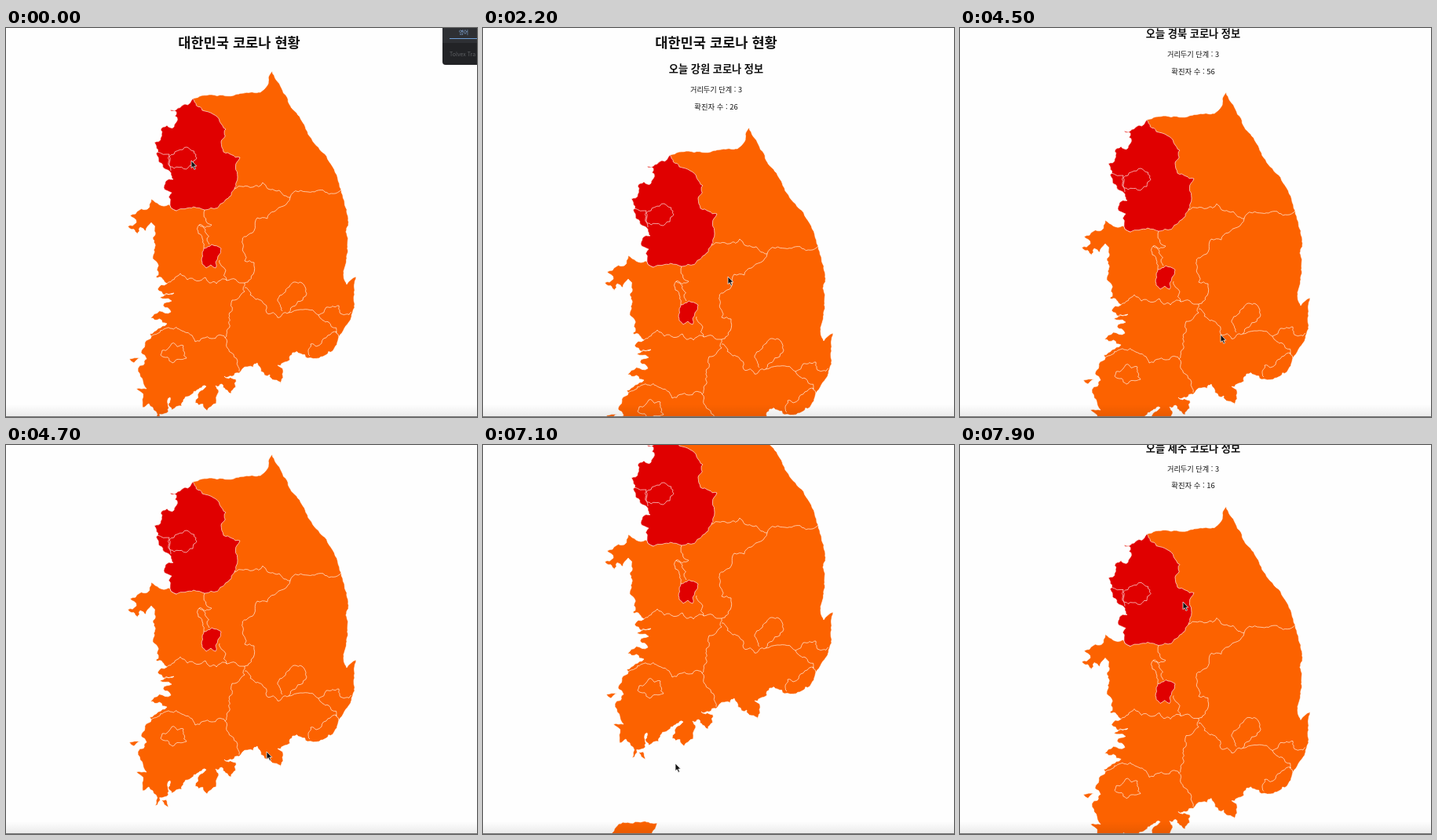
Animation, 600 px wide and 496 px high, one loop 8 s. Source, as an HTML page:

```html
<!DOCTYPE html>
<html lang="ko">
<head>
<meta charset="utf-8">
<title>대한민국 코로나 현황</title>
<style>
  html, body { margin: 0; width: 100%; height: 100%; overflow: hidden; background: #fefefe; }
  svg { display: block; width: 600px; height: 496px; }
  text { font-family: "Noto Sans CJK KR", "Noto Sans CJK", "Noto Sans", sans-serif; fill: #111; }
  .mid { text-anchor: middle; }
  .bold { font-weight: 700; }
</style>
</head>
<body>
<svg viewBox="0 0 600 496">
  <defs>
    <linearGradient id="shade" x2="0" y2="1">
      <stop offset="0" stop-color="#000" stop-opacity="0"/>
      <stop offset="1" stop-color="#000" stop-opacity=".08"/>
    </linearGradient>
  </defs>
  <g id="page">
    <text class="mid bold" x="297" y="25" font-size="17.6">대한민국 코로나 현황</text>
    <g id="info">
      <text class="mid bold" id="head" x="297" y="57.3" font-size="13.2"></text>
      <text class="mid" id="level" x="297" y="82.3" font-size="9.2"></text>
      <text class="mid" id="count" x="297" y="103.8" font-size="9.4"></text>
    </g>
    <g id="map" stroke-width=".8" stroke-linejoin="round"></g>
  </g>
  <g id="popup">
    <path d="M556 0H600V47H560Q556 47 556 43Z" fill="#222326"/>
    <path d="M556 0H600V19H556Z" fill="#2e3034"/>
    <path d="M565 13.5H600" stroke="#6f9fd8" stroke-width="1.2"/>
    <text x="577" y="7.5" font-size="6.6" style="fill:#8ab4e8">영어</text>
    <text x="565" y="36" font-size="7" style="fill:#5d5f63">Tolvex Tra</text>
  </g>
  <rect y="480" width="600" height="16" fill="url(#shade)"/>
  <rect y="495" width="600" height="1" fill="#777"/>
  <path id="cursor" d="M0 0V9.6L2.2 7.7 3.8 11.4 5.5 10.6 3.9 7.1H6.8Z" fill="#111" stroke="#fff" stroke-width=".7"/>
</svg>
<script>
const $ = id => document.getElementById(id);

let seed = 11;
const rand = () => (seed = (seed * 16807) % 2147483647) / 2147483647;

// Splits a segment at a randomly shifted middle until the pieces are short.
function split(a, b, bend) {
  const dx = b[0] - a[0], dy = b[1] - a[1];
  if (Math.hypot(dx, dy) < 4) return [b];
  const k = (rand() - 0.5) * bend;
  const mid = [(a[0] + b[0]) / 2 - dy * k, (a[1] + b[1]) / 2 + dx * k];
  return [...split(a, mid, bend), ...split(mid, b, bend)];
}

// Turns key points "x,y x,y" into a ragged line.
function rough(keys, bend = 0.5) {
  const pts = keys.trim().split(/\s+/).map(s => s.split(',').map(Number));
  const line = pts.slice(1).flatMap((p, i) => split(pts[i], p, bend));
  return [pts[0], ...line].map(p => p.map(v => v.toFixed(1)).join()).join(' ');
}

const gyeonggiCoast = rough(`217,233 209,222 211,210 202,206 203,196 213,193 203,180 194,165 189,146 197,140
  205,124 214,126 217,107 209,104 228,97 238,90`);
const gyeonggiEdge = rough(`238,90 250,105 264,110 280,129 274,145 277,158 298,165 295,190 291,205 281,218
  253,232 239,228 217,233`, .35);
const eastCoast = rough(`238,90 262,85 290,86 324,82 333,73 339,55 344,66 358,88 382,129 398,152 427,206
  431,220 436,243 435,277 430,310 434,327 446,317 444,340 439,372 424,394 416,412`, .2);
const southCoast = rough(`416,412 399,421 384,421 365,414 353,427 346,430 353,446 350,454 336,442 320,427
  297,440 278,444 293,448 287,466 275,454 267,456 271,464 256,488 241,478 246,464 255,457 226,474 224,482
  211,487 209,471 207,489`);
const westCoast = rough(`207,489 190,503 182,479 174,484 166,460 179,460 168,434 179,422 172,414 184,396
  183,390 205,377 184,370 210,362 200,354 211,348 196,344 214,338 193,333 205,326`);
const chungnamCoast = rough(`205,326 191,318 194,311 187,291 189,259 185,248 178,259 171,254 167,263 155,253
  166,248 158,239 170,232 180,231 185,218 190,222 213,224 217,233`);
const daejeon = rough('252,281 262,276 274,281 270,291 267,306 261,302 255,306 250,301 252,281', .3);

const islands = [
  '198,496 204,495 207,505 198,496',
  '157,422 171,421 163,427 157,422',
  '163,600 178,585 204,584 222,586 215,600 163,600'
].map(s => rough(s, .3));

const borders = [
  '291,205 314,203 327,197 342,207 362,216 385,209 427,206',
  '362,216 342,234 320,242 308,264 302,280 304,297 316,299 315,314 304,325',
  '253,232 262,251 246,251 245,262 252,281',
  '246,251 254,257 259,276',
  '272,296 280,309 281,322 304,325',
  '205,326 222,313 231,321 254,318 268,326 281,322',
  '304,325 304,336 288,347 284,377 279,395 287,414 297,438',
  '184,396 194,389 209,383 224,386 241,400 262,396 279,395',
  '199,411 226,405 230,421 212,427 197,417 199,411',
  '304,331 315,343 329,352 332,363 360,363 375,359 398,366',
  '352,361 346,346 361,330 377,325 378,347 360,363',
  '398,366 408,356 424,354 425,362 440,362',
  '398,366 411,375 424,394',
  '387,418 388,403 402,402 422,388',
  '208,164 231,152 243,166 238,175 214,179 208,164',
  '193,158 208,161 207,171 210,182'
].map(s => rough(s));

const area = d => `M${d}Z`;
const path = (d, fill) => `<path d="${d}" fill="${fill}" stroke="#fff" stroke-opacity=".8"/>`;
const land = [eastCoast, southCoast, westCoast, chungnamCoast, gyeonggiCoast].join(' ');
$('map').innerHTML =
  path([land, ...islands].map(area).join(''), '#fc6200') +
  path(area(gyeonggiCoast + ' ' + gyeonggiEdge) + area(daejeon), '#e00000') +
  path(borders.map(d => 'M' + d).join(''), 'none');

// Stops of the pointer: time in ms, x, y.
const stops = [[0, 236, 169], [300, 229, 166], [1600, 335, 215], [2200, 312, 317], [3700, 365, 300],
  [4300, 332, 391], [4900, 332, 391], [5400, 273, 324], [6200, 195, 487], [6700, 195, 487],
  [7100, 245, 406], [7600, 245, 406], [7900, 284, 200]];
const reports = [[200, '서울', 4, 464], [1700, '강원', 3, 26], [3800, '경북', 3, 56], [6400, '제주', 3, 16]];

const part = (t, from, to) => Math.min(1, Math.max(0, (t - from) / (to - from)));
const easeOut = u => 1 - (1 - u) ** 2;
const easeInOut = u => u * u * (3 - 2 * u);
const scrollAt = t => 176 * easeOut(part(t, 4400, 5130)) - 127.5 * easeInOut(part(t, 7100, 7500));

function pointerAt(t) {
  const i = Math.max(1, stops.findIndex(s => s[0] >= t));
  const [from, ax, ay] = stops[i - 1], [to, bx, by] = stops[i];
  const u = part(t, from, to);
  return [ax + (bx - ax) * u, ay + (by - ay) * u];
}

const move = (id, x, y) => $(id).setAttribute('transform', `translate(${x} ${y})`);
const show = (id, on) => $(id).style.display = on ? '' : 'none';

function draw(now) {
  const t = Math.floor(now % 8000 / 100) * 100;
  const report = reports.filter(r => r[0] <= t).pop();
  if (report) {
    const [, place, level, count] = report;
    $('head').textContent = `오늘 ${place} 코로나 정보`;
    $('level').textContent = `거리두기 단계 : ${level}`;
    $('count').textContent = `확진자 수 : ${count}`;
  }
  show('info', report);
  show('popup', t < 100);
  move('map', 0, report ? 72 : 0);
  move('page', 0, -scrollAt(t));
  move('cursor', ...pointerAt(t));
}

const start = performance.now();
function tick() {
  draw(performance.now() - start);
  requestAnimationFrame(tick);
}
tick();
</script>
</body>
</html>
```
